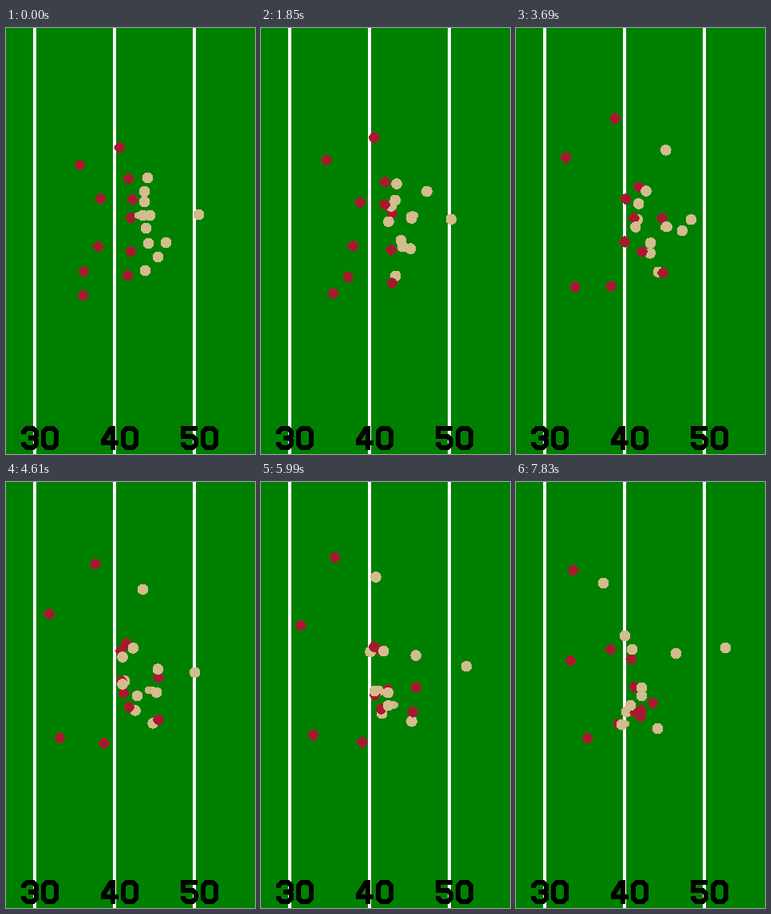
A matplotlib script that plays this animation: 312 by 533 pixels, repeating every 8 s.

```python
import numpy as np
import matplotlib.pyplot as plt
from matplotlib.animation import FuncAnimation
from matplotlib.patches import Ellipse, Polygon

W, H, DPI = 312, 533, 100
PT = 72 / DPI                      # points per pixel
LOOP, TICK = 8000, 20              # ms
FIRST, STEP = 240, 230             # ms: first pose, then every later pose
LAST = 34
RED, GOLD, LEATHER = "#a71930", "#d3bc8d", "#d2b48c"

# Each player runs a cubic curve through four points: the snap,
# the break, the turn and the end of the play, at these poses.
KEYS = (0, 12, 22, LAST)

COVERAGE = [
    [(142, 149), (134, 125), (105, 98), (71, 110)],
    [(92, 171), (72, 162), (51, 168), (68, 223)],
    [(118, 213), (130, 216), (146, 210), (144, 221)],
    [(156, 237), (173, 233), (193, 248), (171, 276)],
    [(115, 273), (124, 270), (152, 262), (148, 256)],
    [(97, 304), (114, 317), (124, 327), (128, 302)],
    [(96, 334), (82, 328), (65, 318), (89, 320)],
]
BALL = [
    [(168, 234), (191, 240), (176, 266), (134, 302)],
]
BLOCKERS = [
    [(173, 204), (161, 218), (142, 217), (136, 192)],
    [(173, 217), (157, 230), (147, 253), (157, 267)],
    [(178, 269), (173, 277), (158, 287), (138, 287)],
    [(174, 303), (172, 308), (186, 300), (177, 308)],
]
RUSHERS = [
    [(153, 188), (155, 195), (148, 203), (118, 209)],
    [(158, 214), (151, 228), (143, 254), (149, 288)],
    [(156, 279), (161, 278), (152, 282), (156, 285)],
    [(152, 309), (174, 314), (192, 293), (156, 293)],
]
BACKS = [
    [(177, 187), (166, 199), (157, 209), (145, 209)],
    [(171, 234), (154, 245), (144, 255), (143, 279)],
    [(175, 250), (172, 268), (162, 266), (157, 257)],
    [(190, 286), (187, 263), (191, 227), (200, 214)],
    [(200, 268), (200, 176), (162, 127), (109, 126)],
    [(180, 234), (202, 239), (244, 236), (262, 207)],
    [(241, 233), (225, 245), (178, 268), (132, 303)],
]

# Layers from bottom to top: routes, colour, size (None for the gem shape)
DOT = (12.4, 12.4)
LAYERS = [
    (COVERAGE, RED, None),
    (BALL, LEATHER, (14, 9)),
    (BLOCKERS, GOLD, DOT),
    (RUSHERS, RED, None),
    (BACKS, GOLD, DOT),
]

# Centre lines of the block numerals in a cell 16 wide and 24 high
BOWL = [(16, 20), (12, 24), (4, 24), (0, 20), (0, 17)]
STROKES = {
    "0": [[(7, 0), (12, 0), (16, 4)] + BOWL[:4] + [(0, 4), (4, 0), (8, 0)]],
    "3": [[(0, 7), (0, 4), (4, 0), (12, 0), (16, 4), (16, 9), (13, 12), (16, 15)] + BOWL,
          [(6, 12), (13, 12)]],
    "4": [[(12, 27), (12, -3)],
          [(10, -1), (0, 15), (0, 18), (19, 18)]],
    "5": [[(18, 0), (0, 0), (0, 10), (12, 10), (16, 14)] + BOWL],
}


def draw_digit(char, x, y):
    for stroke in STROKES[char]:
        sx, sy = np.transpose(stroke)
        ax.plot(x + sx, y + sy, color="black", lw=6 * PT, zorder=2,
                solid_capstyle="butt", solid_joinstyle="miter")


fig = plt.figure(figsize=(W / 100, H / 100), dpi=DPI, facecolor="green")
ax = fig.add_axes([0, 0, 1, 1])
ax.set_xlim(0, W)
ax.set_ylim(H, 0)
ax.axis("off")

for n, x in enumerate((36, 136, 236)):
    ax.fill_between([x - 2, x + 2], 0, H, color="white", lw=0, zorder=1)
    draw_digit("345"[n], x - 14, 501)
    draw_digit("0", x + 11, 501)

angle = np.arange(8) * np.pi / 4
radius = np.where(np.arange(8) % 2, 5.8, 6.6)
GEM = np.column_stack([radius * np.cos(angle), radius * np.sin(angle)])


class Piece:
    def __init__(self, route, color, size, z):
        self.curve = np.polyfit(KEYS, np.array(route, float) + 0.5, 3)
        style = dict(fc=color, lw=0, zorder=z, antialiased=False)
        if size:
            self.patch = Ellipse((0, 0), *size, **style)
        else:
            self.patch = Polygon(GEM, closed=True, **style)
        ax.add_patch(self.patch)

    def pose(self, k):
        spot = k ** np.arange(3, -1, -1) @ self.curve
        if isinstance(self.patch, Ellipse):
            self.patch.center = spot
        else:
            self.patch.set_xy(GEM + spot)


pieces = [Piece(route, color, size, 3 + z)
          for z, (routes, color, size) in enumerate(LAYERS)
          for route in routes]


def update(frame):
    t = frame * TICK + TICK // 2   # middle of the tick
    k = min(max(0, (t - FIRST) // STEP + 1), LAST)
    for piece in pieces:
        piece.pose(k)
    return [piece.patch for piece in pieces]


anim = FuncAnimation(fig, update, frames=LOOP // TICK, interval=TICK,
                     init_func=lambda: update(0), repeat=True, repeat_delay=0)
plt.show()
```
